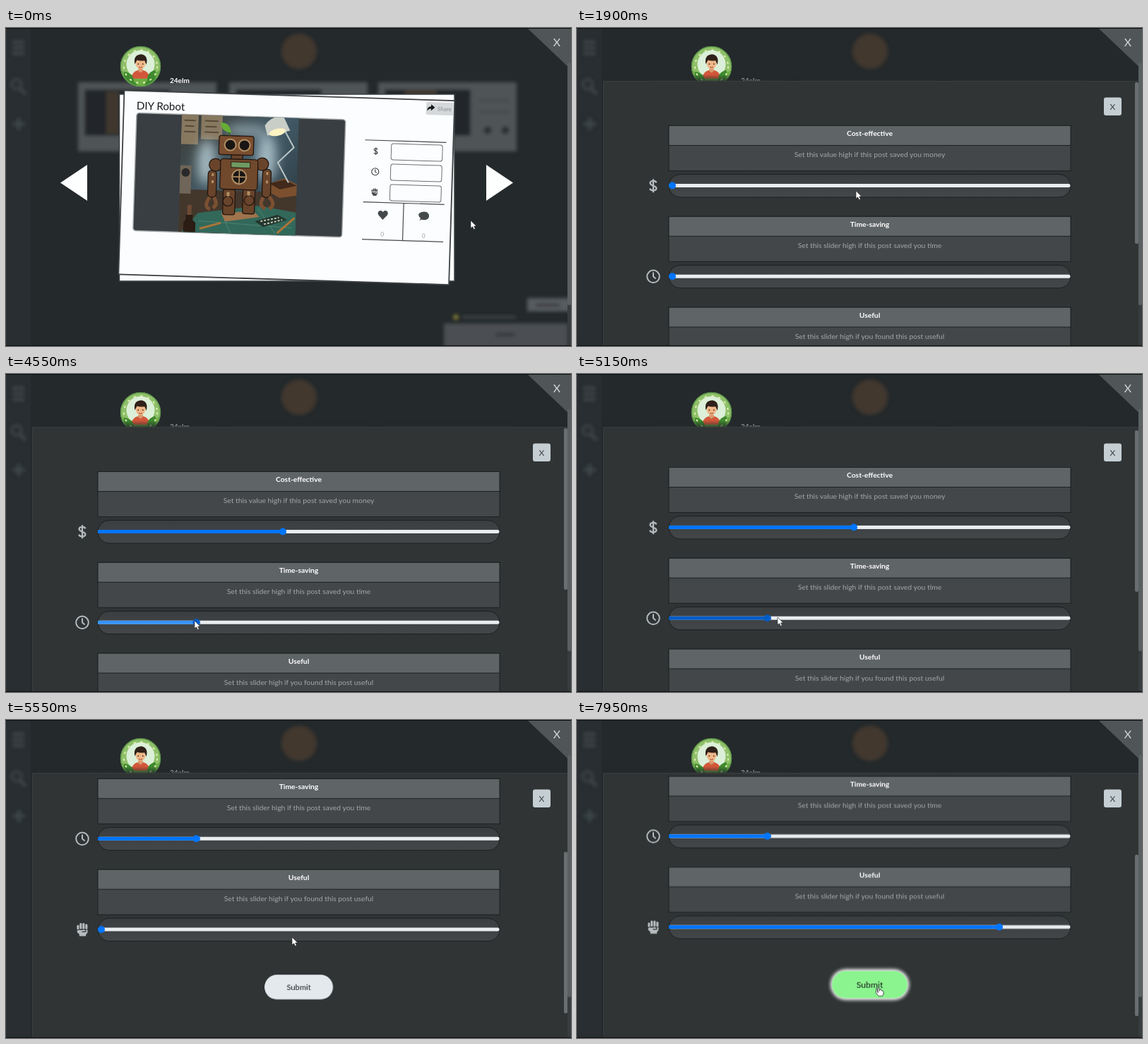
These frames come from a looping animation (800 px wide and 451 px high, 8 s). An HTML page:

```html
<!DOCTYPE html>
<html lang="en">
<head>
<meta charset="utf-8">
<title>Rate a post</title>
<style>
html, body { margin: 0; width: 100%; height: 100%; overflow: hidden; background: #24292b; }
svg { display: block; width: 800px; height: 451px; font-family: Lato, sans-serif; }
.mid { text-anchor: middle; }
.head { font-size: 10.3px; font-weight: 700; fill: #fff; text-anchor: middle; }
.hint { font-size: 10.35px; fill: #a3a7a9; text-anchor: middle; }
.ink { fill: none; stroke: #44494c; stroke-width: 1.2; }
.field { fill: none; stroke: #6d7275; }
.anim, .anim * { animation: 8s linear infinite; }

#modal { animation-name: open; }
@keyframes open {
  0%, 6.2% { opacity: 0; transform: translateY(30px); animation-timing-function: ease-out; }
  10.6%, 100% { opacity: 1; transform: none; }
}

/* scrolling */
#page { animation-name: scroll; }
@keyframes scroll {
  0%, 63.8% { transform: none; animation-timing-function: ease-in; }
  66.25% { transform: translateY(-70.5px); }
  69.3% { transform: translateY(-184px); animation-timing-function: ease-in-out; }
  71.5%, 100% { transform: translateY(-187.5px); }
}
#bar { animation-name: bar; }
@keyframes bar {
  0%, 63.8% { transform: none; animation-timing-function: ease-in; }
  66.25% { transform: translateY(33px); }
  69.3% { transform: translateY(110px); animation-timing-function: ease-in-out; }
  71.5%, 100% { transform: translateY(114px); }
}

/* sliders */
.value { color: #0075ff; transform: translateX(135px); }
#cost { animation-name: cost, costTint; animation-timing-function: linear, step-end; }
#time { animation-name: time, timeTint; animation-timing-function: linear, step-end; }
#use { animation-name: use, useTint; animation-timing-function: linear, step-end; }
@keyframes cost {
  0%, 25% { transform: translateX(135px); }
  25.01% { transform: translateX(395px); }
  32%, 100% { transform: translateX(392px); }
}
@keyframes time {
  0%, 44.4% { transform: translateX(135px); }
  44.41% { transform: translateX(392px); animation-timing-function: ease-in-out; }
  51.2%, 100% { transform: translateX(269.5px); }
}
@keyframes use {
  0%, 84.4% { transform: translateX(135px); }
  84.41% { transform: translateX(672px); animation-timing-function: ease-in-out; }
  91%, 100% { transform: translateX(598px); }
}
@keyframes costTint { 0% { color: #0075ff; } 25% { color: #3793ff; } 33% { color: #005cc8; } 36% { color: #0075ff; } }
@keyframes timeTint { 0% { color: #0075ff; } 44.4% { color: #3793ff; } 57.5% { color: #005cc8; } 66.8% { color: #0075ff; } }
@keyframes useTint { 0% { color: #0075ff; } 84.4% { color: #3793ff; } 92% { color: #005cc8; } 94.4% { color: #0075ff; } }
#timeKnob { animation-name: knob; animation-timing-function: step-end; }
@keyframes knob { 0% { fill: #0075ff; } 44.4% { fill: #005cc8; } 66% { fill: #0075ff; } }

/* submit */
#submit { transform-origin: 414.5px 562.8px; animation-name: grow; }
#submit .face { fill: #e4e9ed; animation-name: green; }
#submit .glow { animation-name: glow; }
@keyframes grow { 0%, 95.6% { transform: none; } 98.8%, 100% { transform: scale(1.1); } }
@keyframes green { 0%, 95.6% { fill: #e4e9ed; } 98.8%, 100% { fill: #8bf48f; } }
@keyframes glow { 0%, 95.6% { opacity: 0; } 98.8%, 100% { opacity: 1; } }

/* pointer */
#pointer { animation-name: move; animation-timing-function: ease-in-out; }
@keyframes move {
  0%, .6% { transform: translate(658px, 273px); }
  5.6%, 13.1% { transform: translate(592px, 205px); }
  23.7% { transform: translate(395px, 231px); }
  25% { transform: translate(395px, 222px); }
  32%, 34.4% { transform: translate(392px, 222px); }
  44.4% { transform: translate(392px, 350px); }
  51.2%, 63% { transform: translate(267px, 350px); }
  68.7%, 72% { transform: translate(405px, 308px); }
  81.8%, 84.4% { transform: translate(670px, 294px); }
  91%, 92% { transform: translate(598px, 294px); }
  97.5%, 100% { transform: translate(427px, 380px); }
}
#arrow { animation-name: arrow; animation-timing-function: step-end; }
#hand { animation-name: hand; animation-timing-function: step-end; }
@keyframes arrow { 0% { opacity: 1; } 65.5% { opacity: 0; } 66.9% { opacity: 1; } 95.6% { opacity: 0; } }
@keyframes hand { 0% { opacity: 0; } 95.6% { opacity: 1; } }
</style>
</head>
<body>
<svg viewBox="0 0 800 451">
<defs>
  <filter id="soft" x="-20%" y="-20%" width="140%" height="140%"><feGaussianBlur stdDeviation="2.6"/></filter>
  <filter id="haze" x="-50%" y="-50%" width="200%" height="200%"><feGaussianBlur stdDeviation="8"/></filter>
  <linearGradient id="shade" x2="0" y2="1">
    <stop stop-color="#24292b" stop-opacity="0"/><stop offset="1" stop-color="#24292b" stop-opacity=".75"/>
  </linearGradient>
  <linearGradient id="pill" x2="0" y2="1"><stop stop-color="#3a3e40"/><stop offset="1" stop-color="#434749"/></linearGradient>
  <linearGradient id="wall" x2="1" y2="1"><stop stop-color="#3d3a33"/><stop offset=".45" stop-color="#425a66"/><stop offset="1" stop-color="#27363d"/></linearGradient>
  <clipPath id="view"><rect x="37" y="76" width="753" height="374"/></clipPath>
  <clipPath id="rail"><rect x="130" y="215" width="569" height="16"/></clipPath>
  <clipPath id="photo"><rect width="166" height="166.5"/></clipPath>
  <clipPath id="round"><circle r="28.5"/></clipPath>

  <g id="dollar"><path d="M4.4-4.3C3.4-8-4.4-7.6-4.4-3.6S4.4-.3 4.4 3.6 -3.6 8-4.8 4M0-9.5V9.5" fill="none" stroke="currentColor" stroke-width="2.3"/></g>
  <g id="clock" fill="none" stroke="currentColor" stroke-width="2"><circle r="8.8"/><path d="M0-6V0L3.6 3.2"/></g>
  <g id="fist" fill="currentColor">
    <rect x="-7.6" y="-6.4" width="3" height="6.400" rx="1.4"/><rect x="-3.700" y="-9.2" width="3.1" height="8.600" rx="1.4"/>
    <rect x=".3" y="-9.2" width="3.1" height="8.600" rx="1.4"/><rect x="4.3" y="-7.8" width="3.1" height="7.400" rx="1.4"/>
    <path d="M-7.5.8Q-6 1.600-4 .4Q-1.5 1.400 0 .4H3Q4.500 1 4.500 2.600H-.5V3.800H5.300V.4H7.500V3.500Q7.200 5.800 5.200 6.800V9.300H-4.200V6.600L-7 4.200Z"/>
  </g>
  <g id="box">
    <rect x="130" y="138.500" width="569" height="64" fill="#434749" stroke="#1c2021"/>
    <rect x="130" y="138.500" width="569" height="28" fill="#5f6466" stroke="#1c2021"/>
    <rect x="130" y="207.500" width="569" height="32.500" rx="16.200" fill="url(#pill)" stroke="#1c2021"/>
    <rect x="130.500" y="221" width="568" height="5" rx="2.500" fill="#e9edef"/>
  </g>
  <g id="tile">
    <rect width="196" height="98" fill="#4f5456"/>
    <rect x="9" y="10" width="122" height="66" rx="3" fill="#23282b"/>
    <path d="M142 26H186M142 42H186" stroke="#44494b" stroke-width="3"/>
    <circle cx="155" cy="68" r="5.500" fill="#292e30"/><circle cx="180" cy="68" r="5.500" fill="#292e30"/>
  </g>
  <g id="leaf"><path d="M0 0C-9-5-9-15-3-21C5-15 6-6 0 0Z"/></g>
</defs>

<!-- blurred feed -->
<rect width="800" height="451" fill="#24292b"/>
<rect width="35" height="451" fill="#282e31"/>
<g filter="url(#soft)">
  <path d="M9 20H26M9 28H26M9 36H26" stroke="#3d4446" stroke-width="5"/>
  <circle cx="15" cy="80" r="7" fill="none" stroke="#41484b" stroke-width="3"/>
  <path d="M20 86L28 94M9 136H27M18 127V145" stroke="#41484b" stroke-width="4"/>
  <circle cx="415" cy="33" r="25" fill="#42392f"/>
  <use href="#tile" x="102" y="77"/>
  <use href="#tile" x="316" y="77"/>
  <use href="#tile" x="527" y="77"/>
  <path d="M142 90H160V150H142ZM565 88H610V96H565Z" fill="#40382e"/>
  <rect x="738" y="383" width="62" height="19" fill="#575c5e"/>
  <path d="M750 393H784" stroke="#34393b" stroke-width="4"/>
  <circle cx="637" cy="410" r="3.500" fill="#8a8335"/>
  <path d="M646 410H722" stroke="#3d4244" stroke-width="4"/>
  <rect x="620" y="419" width="176" height="34" fill="#4b5052"/>
  <path d="M693 435H721" stroke="#34393b" stroke-width="5"/>
</g>

<!-- profile -->
<g transform="translate(190.500 54.500)">
  <g clip-path="url(#round)">
    <circle r="29" fill="#8fc069"/>
    <circle cy="-3" r="20" fill="#dcefd8"/>
    <path d="M-27 6Q-14 14 0 13T27 6V29H-27Z" fill="#6fae45"/>
    <g transform="translate(0 -2.500) scale(.82)">
      <path d="M-16 24Q-15 10 0 9Q15 10 16 24Z" fill="#d2573a"/>
      <path d="M-4 5H4V11L0 14L-4 11Z" fill="#d99a6e"/>
      <ellipse cy="-2" rx="8.500" ry="9.500" fill="#efb788"/>
      <path d="M-10-1Q-13-17 1-18Q14-16 10 0L7-7Q-2-6-6-8Z" fill="#2f2019"/>
      <path d="M-4-2V0M4-2V0" stroke="#33221a" stroke-width="1.600"/>
      <path d="M-3 4Q0 6.500 3 4" fill="none" stroke="#a03c30" stroke-width="1.200"/>
    </g>
    <g fill="#3f8a2e">
      <use href="#leaf" transform="translate(-10 24) rotate(-30)"/><use href="#leaf" transform="translate(-5 27) rotate(-68)"/>
      <use href="#leaf" transform="translate(11 24) rotate(36)"/><use href="#leaf" transform="translate(6 27) rotate(72)"/>
    </g>
    <circle r="23.500" fill="none" stroke="#dff0b4" stroke-width="2" stroke-dasharray="3 7"/>
  </g>
  <circle r="28" fill="none" stroke="#5f9a4c" stroke-width="1.500"/>
</g>
<text x="232" y="78" font-size="10" font-weight="700" fill="#fff">24elm</text>

<!-- post card -->
<rect x="160.500" y="94" width="474.500" height="265" fill="#fcfdfe" stroke="#3c4144" stroke-width="1.500"/>
<g transform="translate(167.500 88.500) rotate(1.8)">
  <rect width="468" height="261" fill="#fcfdfe" stroke="#3c4144" stroke-width="1.800"/>
  <text x="18" y="26.500" font-size="15.200" fill="#17191a" transform="rotate(-.6 19 26)">DIY Robot</text>
  <rect x="18.500" y="31.400" width="296" height="167" rx="4" fill="#383e42" stroke="#a4a8aa" stroke-width="1.500"/>
  <g transform="translate(82.500 31.500)" clip-path="url(#photo)">
    <rect width="166" height="167" fill="url(#wall)"/>
    <g fill="#877860"><path d="M0 0H24V42H0ZM28-2H58V34H28Z"/></g>
    <path d="M4 8H20M5 16H18M4 24H20M33 8H52M34 16H50M33 24H53" stroke="#574936" stroke-width="2"/>
    <g filter="url(#haze)" fill="#bcd2da"><ellipse cx="37" cy="66" rx="13" ry="32" opacity=".8"/><ellipse cx="122" cy="58" rx="14" ry="34" opacity=".8"/><ellipse cx="92" cy="20" rx="30" ry="8" opacity=".6"/></g>
    <path d="M0 106H166V167H0Z" fill="#43372c"/>
    <path d="M27 139L112 126L166 134V167H4Z" fill="#32685a"/>
    <path d="M28 150L160 156M60 137L74 166M112 130L138 166" stroke="#4d8272"/>
    <path d="M0 72H16V112H0Z" fill="#6f6659"/><circle cx="8" cy="82" r="6" fill="#2a292a"/>
    <path d="M127 94L148 86L166 94V110L142 114L127 106Z" fill="#7c4f2e"/><path d="M127 94L148 88L166 96L142 102Z" fill="#41291b"/>
    <path d="M145 16L160 42L138 64L154 92" fill="none" stroke="#bdc7c8" stroke-width="2"/>
    <path d="M118 12Q128-4 145 0L154 18Q136 24 122 26Z" fill="#c9cec7"/><ellipse cx="136" cy="21" rx="12" ry="5" transform="rotate(-14 136 21)" fill="#fff3c4"/>
    <path d="M60 138L106 134L114 142L66 150Z" fill="#a0744c"/>
    <g fill="#69442b" stroke="#21150f" stroke-width="1.300">
      <rect x="62" y="104" width="17" height="36" rx="3"/><rect x="90" y="102" width="17" height="36" rx="3"/>
      <rect x="40" y="78" width="12" height="38" rx="5"/><rect x="117" y="74" width="12" height="40" rx="5"/>
      <circle cx="50" cy="70" r="9"/><circle cx="116" cy="67" r="9"/>
      <rect x="72" y="54" width="16" height="9"/>
      <rect x="57" y="61" width="53" height="43" rx="4" fill="#70482c"/>
      <rect x="54" y="28" width="49" height="27" rx="3" fill="#7a4e30"/>
      <circle cx="69" cy="121" r="7"/><circle cx="99" cy="119" r="7"/>
    </g>
    <g fill="none" stroke="#7c5031" stroke-width="5"><path d="M43 116Q34 130 44 133M49 116Q56 126 48 131"/><path d="M119 114Q112 126 122 130M127 113Q138 123 128 130"/></g>
    <g fill="#191614" stroke="#b28f62" stroke-width="2"><circle cx="70" cy="41" r="8"/><circle cx="90" cy="41" r="8"/><circle cx="84" cy="86" r="10"/></g>
    <path d="M84 77V95M75 86H93" stroke="#c19a66" stroke-width="1.500"/>
    <rect x="72" y="65" width="27" height="8" fill="#6f9a62" stroke="#2c1b12"/>
    <path d="M45 84H48M45 94H48M122 80H125M122 92H125M69 108V114M98 106V112" stroke="#b28f62" stroke-width="4"/>
    <path d="M68 28Q68 20 63 16" fill="none" stroke="#375f22" stroke-width="2"/><path d="M55 10Q68 8 71 24Q57 23 55 10Z" fill="#66ad35"/>
    <path d="M10 142H20V149L24 153V166H7V153L10 149Z" fill="#2b1c14"/><path d="M12 128H18V142H12Z" fill="#6b4a34"/>
    <path d="M108 148L140 138L154 145L120 156Z" fill="#23352c"/><path d="M116 148L142 142M121 152L147 145" stroke="#bac4b1" stroke-width="2" stroke-dasharray="3 2"/>
    <path d="M30 161L60 152M140 164L164 142" stroke="#ad7438" stroke-width="3"/>
  </g>
  <rect x="428" y="3" width="38.500" height="18" rx="2" fill="#d5d8da"/>
  <path d="M429.500 15.500Q429.500 9 435 9V6L440.500 10.500L435 15V12Q432 12 429.500 15.500Z" fill="#141516"/>
  <text x="444" y="15" font-size="8" font-weight="700" fill="#9ca0a3">Share</text>
  <path class="ink" d="M343 59.500H458M343 147.500H458M343 200.500H458M400.500 147.500V200.500"/>
  <g class="field"><rect x="380.500" y="63.500" width="72.500" height="23" rx="3"/><rect x="380.500" y="92.500" width="72.500" height="23" rx="3"/><rect x="380.500" y="121.500" width="72.500" height="23" rx="3"/></g>
  <g color="#44494c">
    <use href="#dollar" transform="translate(358.700 75) scale(.55)"/>
    <use href="#clock" transform="translate(358.700 104) scale(.57)"/>
    <use href="#fist" transform="translate(358.700 133) scale(.56)"/>
  </g>
  <path d="M371.500 172L365.500 165.500C362 161 368 156 371.500 161C375 156 381 161 377.500 165.500Z" fill="#44494c"/>
  <path d="M423.500 171.500L425 168C418 162 425 158.500 430 158.500C439 158.500 439.500 170 430 170.300Q427 170.300 426 169.800Z" fill="#44494c"/>
  <g class="mid" font-size="9" fill="#a5a9ab"><text x="371.500" y="195.500">0</text><text x="430" y="196">0</text></g>
</g>
<path d="M77 219.500L115 194V245ZM718 219.500L680 194V245Z" fill="#fdfefe"/>

<!-- page corner and scrollbar -->
<path d="M739 1H800V59Z" fill="#505557"/>
<text class="mid" x="780" y="25.500" font-size="16" fill="#d3d7d9">X</text>
<rect x="795" y="49" width="5" height="402" fill="#373c3e"/>
<rect x="795" y="49" width="5" height="344" rx="2" fill="#5a5f62"/>

<!-- rating dialog -->
<g class="anim">
<g id="modal">
  <rect x="37" y="66" width="758" height="9" fill="url(#shade)"/>
  <rect x="37" y="75" width="758" height="376" fill="#303435"/>
  <path d="M37.500 451V75.500H795" fill="none" stroke="#393e40"/>
  <g clip-path="url(#view)">
    <g id="page">
      <use href="#box"/><use href="#box" y="128.800"/><use href="#box" y="257.600"/>
      <g color="#b5bbbe">
        <use href="#dollar" x="108" y="223.700"/><use href="#clock" x="108" y="352.400"/><use href="#fist" x="108" y="481.200"/>
      </g>
      <g class="head"><text x="414.500" y="153">Cost-effective</text><text x="414.500" y="282">Time-saving</text><text x="414.500" y="411">Useful</text></g>
      <g class="hint">
        <text x="414.500" y="183">Set this value high if this post saved you money</text>
        <text x="414.500" y="311.800">Set this slider high if this post saved you time</text>
        <text x="414.500" y="440.500">Set this slider high if you found this post useful</text>
      </g>
      <g clip-path="url(#rail)"><g class="value" id="cost"><rect x="-569" y="221" width="569" height="5" fill="currentColor"/><circle cy="223.500" r="5" fill="#0075ff"/></g></g>
      <g transform="translate(0 128.800)"><g clip-path="url(#rail)"><g class="value" id="time"><rect x="-569" y="221" width="569" height="5" fill="currentColor"/><circle id="timeKnob" cy="223.500" r="5" fill="#0075ff"/></g></g></g>
      <g transform="translate(0 257.600)"><g clip-path="url(#rail)"><g class="value" id="use"><rect x="-569" y="221" width="569" height="5" fill="currentColor"/><circle cy="223.500" r="5" fill="#0075ff"/></g></g></g>
      <g id="submit">
        <rect class="glow" x="364" y="543" width="101" height="39.500" rx="19.700" fill="#fff" filter="url(#soft)"/>
        <rect class="face" x="366" y="545.300" width="97" height="35" rx="17.500"/>
        <text class="mid" x="414.500" y="566.600" font-size="11.200" fill="#191c1d">Submit</text>
      </g>
    </g>
  </g>
  <rect x="746" y="98.500" width="25" height="25.500" rx="3" fill="#c4ced3"/>
  <text class="mid" x="758.500" y="115.500" font-size="12" fill="#3c4144">X</text>
  <rect id="bar" x="790" y="77" width="5" height="229" rx="2" fill="#696e70"/>
</g>
</g>

<path d="M0 .5H800M0 450.500H800" stroke="#0b0d0e"/>

<g class="anim">
<g id="pointer">
  <path id="arrow" d="M0 0V11L2.500 8.800L4.400 12.600L6.400 11.700L4.600 8.100H8Z" fill="#fff" stroke="#222" stroke-width=".6"/>
  <path id="hand" d="M-1 1Q0-1 1.300 1V4.800Q3-.2 4.500 4.500 6.500 4 7 6V9L5.500 12H0L-3.800 7.300Q-3-5.800-1 7.300Z" transform="translate(0 -.5)" fill="#fff" stroke="#222" stroke-width=".8"/>
</g>
</g>
</svg>
</body>
</html>
```
